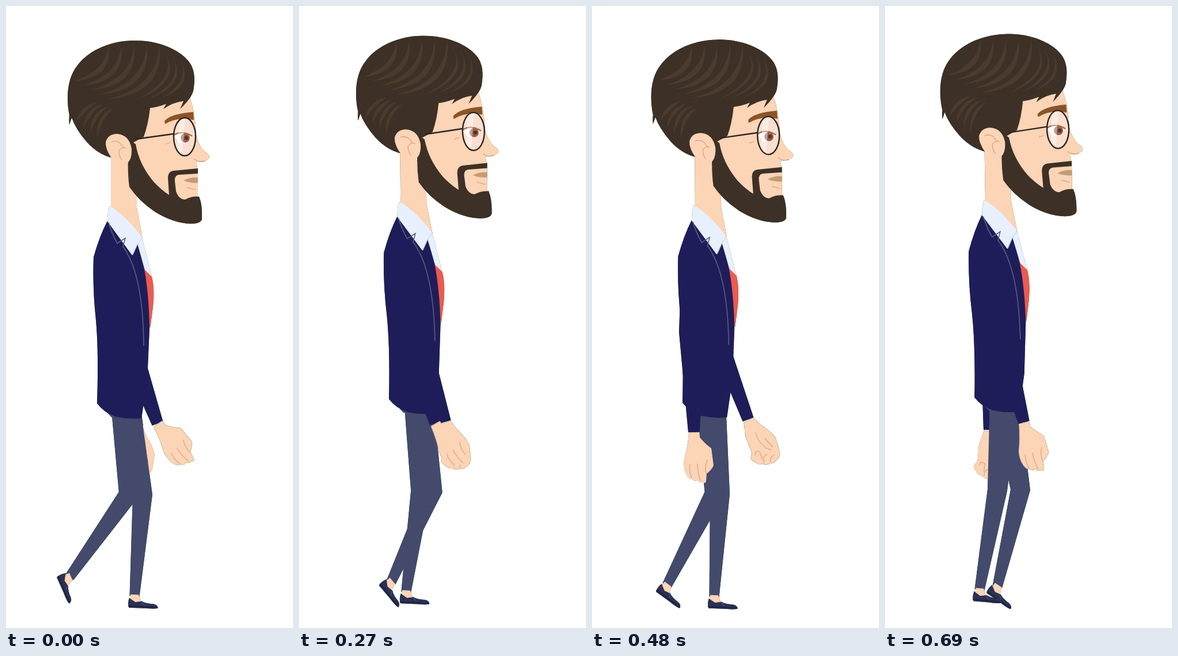
These frames come from a looping animation (498x1080 px, 720 ms). An HTML page:

```html
<!DOCTYPE html>
<html lang="en">
<head>
<meta charset="utf-8">
<title>Walk</title>
<style>
  html, body { margin: 0; width: 100%; height: 100%; overflow: hidden; background: #fff; }
  svg { display: block; width: 100%; height: 100%; }
  #man { filter: drop-shadow(0 0 .6px #1f6b2a); }
  .skin { fill: #fcd4b6; }
  .crease { fill: none; stroke: #dca583; stroke-width: 1.3; stroke-linecap: round; }
  .navy { fill: #1f1d59; }
  .pants { fill: #434a6c; }
  .shoe { fill: #2c3154; }
  .hair { fill: #3d3026; }
  .strand { fill: #4a3b2d; }
  .shirt { fill: #e8f0fd; }
</style>
</head>
<body>
<svg viewBox="0 0 498 1080">
  <defs>
    <g id="foot">
      <path class="skin" d="M-7-3H7L13 12H-7Z"/>
      <path class="shoe" d="M-9 3Q-3 7 2 10L13 8Q20 12 33 12Q41 13 41 19Q36 21 20 20H-9Q-12 12-9 3Z"/>
      <path d="M-10 17L41 18" stroke="#1d2140" stroke-width="2"/>
      <path d="M12 9L18 15" stroke="#454c74" stroke-width="1.5"/>
    </g>
  </defs>
  <g id="man">
    <path id="farSleeve" class="navy"/>
    <g id="farHand">
      <path class="skin" d="M9-3L22 11Q36 20 46 34L52 60Q51 70 45 73Q40 80 34 78Q27 82 21 78Q13 80 9 75Q0 72 1 65Q4 59 2 54L-6 31L-8 5Z"/>
      <path class="crease" d="M12 24Q15 40 24 46Q28 53 37 54M27 34L40 50M9 62Q8 54 17 57L21 70M24 76Q20 66 29 62M35 76Q33 69 41 64"/>
    </g>
    <path id="farLeg" class="pants"/>
    <use id="farFoot" href="#foot"/>
    <path id="nearLeg" class="pants"/>
    <use id="nearFoot" href="#foot"/>

    <g id="body">
      <path class="skin" d="M182 250V352L222 410L237 404L227 350V290Z"/>
      <path class="pants" d="M160 688L183 714H232V690Z"/>
      <path fill="#ec5a50" d="M237 452L253 470Q259 495 254 530L250 560L244 520Z"/>
      <path class="navy" d="M176 373Q162 400 152 436Q150 490 156 545Q161 600 158 690Q170 706 190 713Q212 718 235 716L245 650L249 560Q248 500 240 457L229 413L219 432Z"/>
      <path class="shirt" d="M180 347Q210 366 236 402L253 470L241 458L228 413L219 433L176 374Q176 356 180 347Z"/>
      <path d="M236 402L228 414L220 432" fill="none" stroke="#c9d3e8"/>
      <path d="M178 376Q184 396 193 412L207 403L203 418Q238 465 239 590" fill="none" stroke="#5c5e80" stroke-width="1.6"/>

      <path class="skin" d="M240 175L318 155Q329 185 330 225Q336 245 345 253Q355 258 352 265Q345 271 330 271L333 285V335L290 350L230 300L205 240Z"/>
      <path class="crease" d="M327 266Q334 272 345 269M277 240L285 237M315 315L329 319"/>
      <path class="hair" d="M215 232L225 240Q231 275 256 305Q270 320 283 328L281 299Q281 287 291 286L333 282V291L300 293Q292 294 293 304L295 322Q300 336 311 336Q322 330 335 331Q341 345 340 370Q338 378 320 378Q290 377 258 357Q230 338 214 314Q209 278 215 232Z"/>
      <path fill="#c49b75" d="M308 303Q319 297 333 298V307Q319 308 308 303Z"/>

      <path class="hair" d="M110 206Q109 198 110 190C104 160 106 125 124 103C145 75 185 60 222 60C262 59 300 75 316 95C329 110 328 130 325 147Q322 160 302 179L308 165Q290 167 273 179L278 170Q262 176 250 177Q247 205 239 227L219 238L185 264Q160 258 140 236Q121 214 114 194Z"/>
      <g id="strands" class="strand"></g>

      <path class="skin" d="M183 264Q172 248 173 236Q177 222 193 222Q214 224 218 248Q219 274 202 276Q188 275 183 264Z"/>
      <path class="crease" d="M183 236Q197 231 204 247M196 251Q203 243 208 247M196 251Q196 262 201 267"/>

      <path fill="#8b5427" d="M275 200Q285 187 325 184L326 198Q297 192 276 205Z"/>
      <ellipse cx="310" cy="227" rx="19" ry="33" fill="#f9dfd0"/>
      <path fill="#fff" d="M292 226Q306 216 322 226Q317 240 300 237Z"/>
      <circle cx="311" cy="229" r="8" fill="#99604b"/>
      <circle cx="313" cy="229" r="3.5" fill="#5c3328"/>
      <path d="M291 224Q306 215 323 226" fill="none" stroke="#a8704a" stroke-width="2.5"/>
      <path d="M300 199L311 196L306 256L297 250Z" fill="#fff" opacity=".4"/>
      <ellipse cx="310" cy="227" rx="19" ry="33" fill="none" stroke="#2a2421" stroke-width="2.4"/>
      <path d="M226 231L291 222" stroke="#2a2421" stroke-width="2.4"/>
    </g>

    <path id="nearSleeve" class="navy"/>
    <g id="nearHand">
      <path class="skin" d="M-9 1Q-11 26-17 47Q-19 62-13 74Q-9 82-4 81Q1 87 6 83Q10 89 14 86Q21 91 21 84L22 72Q30 66 34 58L30 28Q18 19 10 9L9 0Z"/>
      <path class="crease" d="M-7 56Q-9 68-4 80M6 55Q6 70 11 84M21 72Q18 58 23 48"/>
    </g>
  </g>
</svg>
<script>
const $ = id => document.getElementById(id);
const LOOP = 720, STEP = 30;
const times = [0, 210, 330, 390, 480, 570, 690];

// One row per channel, one value per key time.
const body = {
  y: [0, -4.5, -11, -8, -1.5, -3, -11],
  tilt: [0, -.4, -.9, -.9, -.35, -.35, -.9]
};
const nearArm = {
  ex: [205, 198, 178, 164, 173, 180, 198],
  x: [263, 249, 217, 184, 177, 191, 241],
  y: [725, 725, 726, 735, 740, 739, 723],
  a: [-32, -34, -18, -6, 0, 0, -9.5]
};
const farArm = {
  x: [228, 240, 271, 283, 271, 241, 181],
  y: [730, 728, 715, 714, 718, 726, 736],
  a: [22, 10, 4, 0, -3, 3, 24]
};
const nearLeg = {
  kx: [212, 227, 234, 222, 222, 221, 195],
  x: [110, 138, 191, 237, 212, 202, 164],
  y: [992, 995, 1008, 1020, 1026, 1023, 1014],
  a: [66, 60, 33, 2, 2, 2, 5]
};
const farLeg = {
  kx: [237, 225, 192, 168, 212, 238, 235],
  x: [223, 205, 160, 131, 130, 150, 195],
  y: [1025, 1020, 1015, 1013, 1006, 991, 1008],
  a: [2, 3, 2, 6, 36, 53, 35]
};

// Cubic Hermite through the key values.
function sample(v, t) {
  let i = 0;
  while (i < times.length - 2 && t >= times[i + 1]) i++;
  const slope = k => {
    const p = Math.max(k - 1, 0), n = Math.min(k + 1, times.length - 1);
    return (v[n] - v[p]) / (times[n] - times[p]);
  };
  const h = times[i + 1] - times[i], u = (t - times[i]) / h, w = 1 - u;
  return v[i] * (1 + 2 * u) * w * w + v[i + 1] * u * u * (3 - 2 * u)
    + h * u * w * (slope(i) * w - slope(i + 1) * u);
}

function pose(part, t) {
  const out = {};
  for (const k in part) out[k] = sample(part[k], t);
  return out;
}

// Tapered outline along joints given as [x, y, half width].
function limb(joints) {
  const left = [], right = [];
  joints.forEach(([x, y, r], i) => {
    const a = joints[Math.max(i - 1, 0)], b = joints[Math.min(i + 1, joints.length - 1)];
    const d = Math.hypot(b[0] - a[0], b[1] - a[1]);
    const nx = (b[1] - a[1]) / d * r, ny = (a[0] - b[0]) / d * r;
    left.push([x + nx, y + ny]);
    right.unshift([x - nx, y - ny]);
  });
  return 'M' + left.concat(right).map(p => p.map(n => n.toFixed(1)).join(' ')).join('L') + 'Z';
}

const place = (id, p) => $(id).setAttribute('transform', `translate(${p.x} ${p.y}) rotate(${p.a})`);

function drawLeg(name, part, t, dy) {
  const p = pose(part, t);
  $(name + 'Leg').setAttribute('d',
    limb([[207, 690 + dy, 25], [p.kx, 849 + dy * .8, 17], [p.x, p.y, 8.5]]));
  place(name + 'Foot', p);
}

function drawArm(name, p, shoulder, elbow) {
  $(name + 'Sleeve').setAttribute('d', limb([shoulder, elbow, [p.x, p.y, 10]]));
  place(name + 'Hand', p);
}

function draw(t) {
  const b = pose(body, t), dx = b.tilt * 2.8;
  $('body').setAttribute('transform', `translate(${dx} ${b.y}) rotate(${b.tilt} 200 700)`);
  drawLeg('far', farLeg, t, b.y);
  drawLeg('near', nearLeg, t, b.y);
  const far = pose(farArm, t), near = pose(nearArm, t);
  drawArm('far', far, [203 + dx, 460 + b.y, 18], [182 + .4 * (far.x - 182), 576, 16]);
  drawArm('near', near, [179 + 2 * dx, 458 + b.y, 22], [near.ex, 566, 22]);
}

// Crescent locks: start, control, end, thickness.
function lock(x0, y0, cx, cy, x1, y1, w) {
  return `<path d="M${x0} ${y0}Q${cx} ${cy} ${x1} ${y1}Q${cx + w} ${cy + w} ${x0} ${y0}Z"/>`;
}
let locks = '';
for (let i = 0; i < 5; i++) {
  locks += lock(178 + i * 22, 69 - i, 172 + i * 23, 112 + i * 7, 120 + i * 14, 130 + i * 8, 13);
  if (i < 4) locks += lock(160 + i * 9, 166 + i * 4, 128 + i * 9, 172 + i * 5, 122 + i * 12, 202 + i * 10, 9);
}
for (let i = 0; i < 3; i++)
  locks += lock(272 + i * 15, 77 + i * 7, 304 + i * 8, 122 + i * 5, 226 + i * 22, 163 - i * 2, 8);
$('strands').innerHTML = locks;

function tick(now) {
  draw(Math.floor(now % LOOP / STEP) * STEP);
  requestAnimationFrame(tick);
}
draw(0);
const start = performance.now();
requestAnimationFrame(function run(now) {
  tickAt(Math.max(0, now - start));
  requestAnimationFrame(run);
});
function tickAt(ms) {
  draw(Math.floor(ms % LOOP / STEP) * STEP);
}
</script>
</body>
</html>
```
